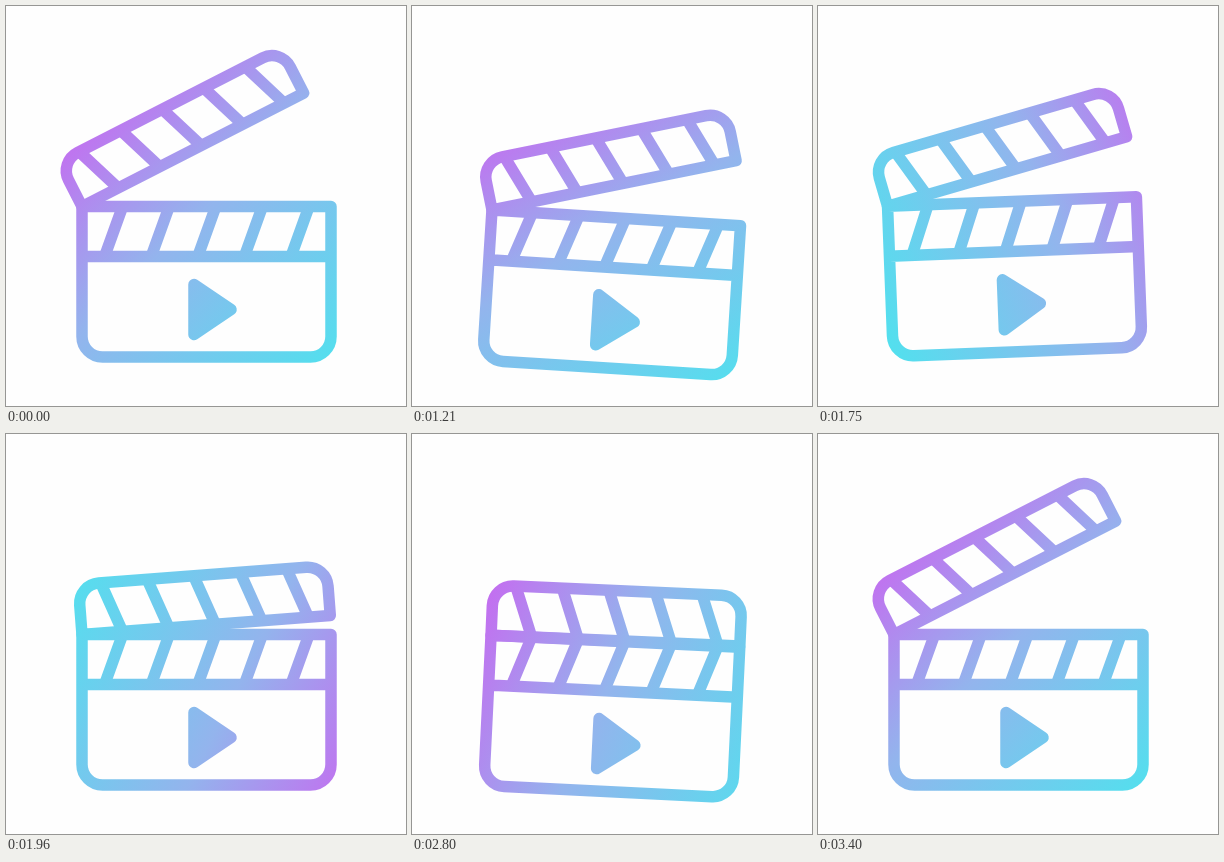
Write an HTML page with a canvas that moves like this. It is 400 by 400 pixels and loops after 3.43 s.

```html
<!DOCTYPE html>
<html lang="en">
<head>
<meta charset="utf-8">
<title>Clapperboard</title>
<style>
html, body { margin: 0; height: 100%; overflow: hidden; background: #fefefe; }
canvas { display: block; width: 400px; height: 400px; }
</style>
</head>
<body>
<canvas id="stage" width="400" height="400"></canvas>
<script>
const ctx = document.getElementById('stage').getContext('2d');
const LOOP = 3430;
const RAD = Math.PI / 180;
const LEFT = 76, RIGHT = 325, HINGE = 200.5, BAND = 50, RADIUS = 20.5;

const progress = (t, start, end) => Math.min(1, Math.max(0, (t - start) / (end - start)));
const smooth = u => u * u * (3 - 2 * u);
const bump = (t, start, end) => Math.sin(Math.PI * progress(t, start, end)) ** 2;

// The board crouches, leaps and lands, claps shut, then crouches and springs open.
function pose(t) {
  const crouch = bump(t, 1030, 1450) + bump(t, 1690, 1955) + bump(t, 2640, 3130);
  const sink = crouch ** 2;
  const leap = bump(t, 1330, 1840);
  const open = (1 - progress(t, 1590, 2210)) ** 2 + smooth(progress(t, 2780, 3080));
  const turn = progress(t, 1030, 3040);
  return {
    x: -crouch - 12 * leap,
    y: 12.2 * sink - 27.5 * leap,
    tilt: 3.8 * crouch - 14.2 * leap,
    arm: -27.1 * open * (1 - 0.49 * sink) - 2 * leap - 8.2 * bump(t, 2970, 3330),
    hue: 360 * (0.25 * turn + 0.75 * smooth(turn)) - 135
  };
}

function rotateAbout(x, y, degrees) {
  ctx.translate(x, y);
  ctx.rotate(degrees * RAD);
  ctx.translate(-x, -y);
}

// Five bars from the hinge line to a height above or below it.
function stripes(height) {
  ctx.beginPath();
  for (let x = 116.6; x < RIGHT; x += 46.6) {
    ctx.moveTo(x, HINGE);
    ctx.lineTo(x - 18, HINGE + height);
  }
  ctx.stroke();
}

function drawBody() {
  ctx.beginPath();
  ctx.roundRect(LEFT, HINGE, RIGHT - LEFT, 150.5, [0, 0, RADIUS, RADIUS]);
  ctx.moveTo(LEFT, HINGE + BAND);
  ctx.lineTo(RIGHT, HINGE + BAND);
  ctx.stroke();
  stripes(BAND);
  ctx.beginPath();
  ctx.moveTo(188, 278.5);
  ctx.lineTo(225, 303.5);
  ctx.lineTo(188, 328.5);
  ctx.closePath();
  ctx.fill();
  ctx.stroke();
}

function drawArm() {
  ctx.beginPath();
  ctx.roundRect(LEFT, HINGE - BAND, RIGHT - LEFT, BAND, [RADIUS, RADIUS, 0, 0]);
  ctx.stroke();
  stripes(-BAND);
}

function gradient({ x, y, arm, hue }) {
  const cx = 220 + x, cy = 240 + y + 1.2 * arm;
  const dx = 185 * Math.cos(hue * RAD), dy = 185 * Math.sin(hue * RAD);
  const fill = ctx.createLinearGradient(cx + dx, cy + dy, cx - dx, cy - dy);
  fill.addColorStop(0, '#c966f0');
  fill.addColorStop(0.45, '#93b4ed');
  fill.addColorStop(1, '#52e0ee');
  return fill;
}

function paint(t) {
  const p = pose(t);
  ctx.clearRect(0, 0, 400, 400);
  ctx.save();
  ctx.lineWidth = 11.5;
  ctx.lineJoin = 'round';
  ctx.translate(p.x, p.y);
  rotateAbout(200, 275, p.tilt);
  drawBody();
  rotateAbout(LEFT, HINGE, p.arm);
  drawArm();
  ctx.restore();

  // Colour the whole silhouette with one turning gradient.
  ctx.save();
  ctx.globalCompositeOperation = 'source-in';
  ctx.fillStyle = gradient(p);
  ctx.fillRect(0, 0, 400, 400);
  ctx.restore();
}

function frame() {
  paint(performance.now() % LOOP);
  requestAnimationFrame(frame);
}
frame();
</script>
</body>
</html>
```
